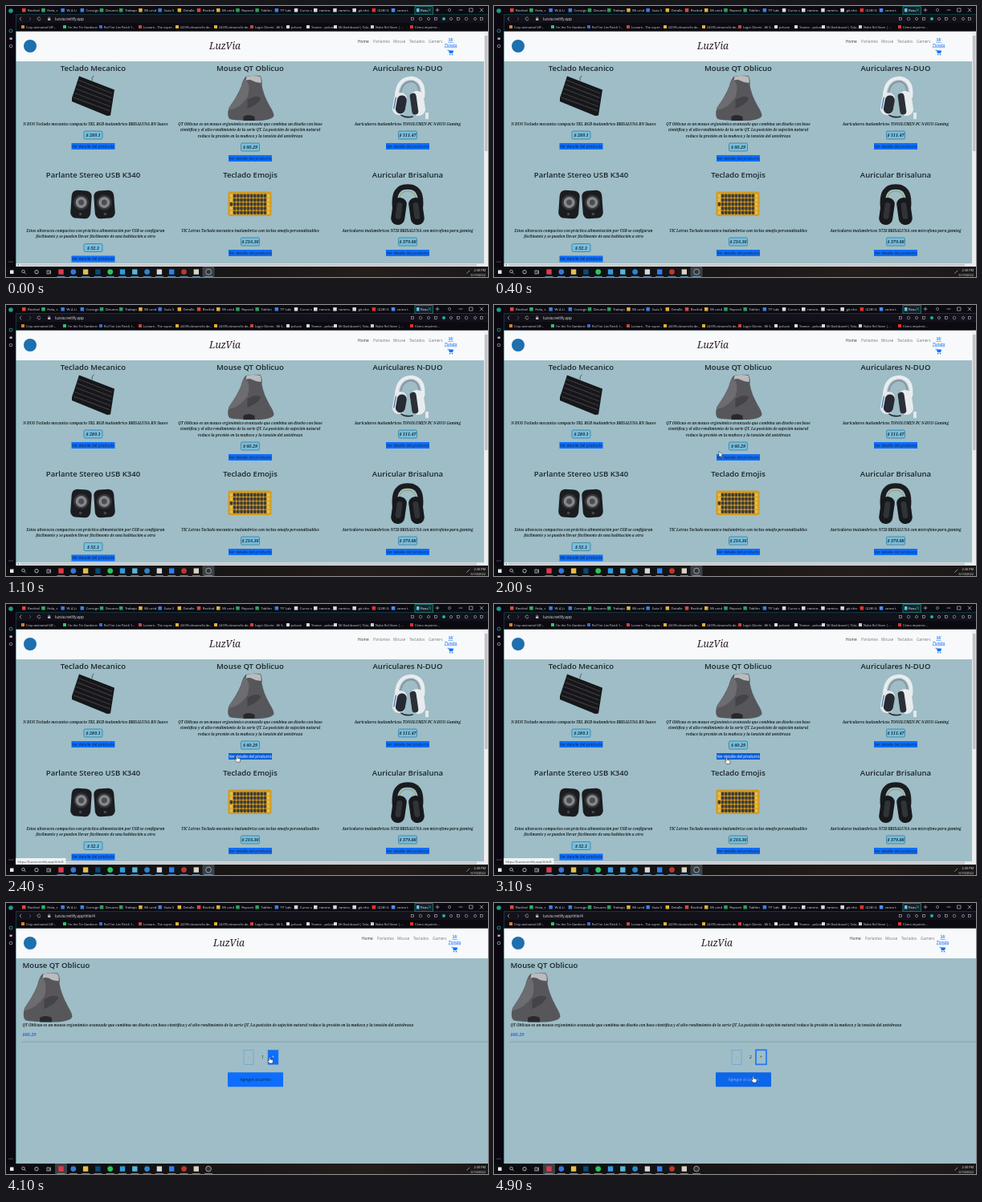
Write an HTML page that moves like this. It is 600 px wide and 338 px high and loops after 5000 ms.

```html
<!DOCTYPE html>
<html lang="es">
<head>
<meta charset="utf-8">
<title>Tienda</title>
<style>
  html, body { margin: 0; width: 100%; height: 100%; overflow: hidden; background: #0a0a0f; }
  svg { display: block; width: 100vw; height: 100vh; }
  text { font-family: "Open Sans", "Noto Sans", sans-serif; white-space: pre; }
  .serif { font-family: "Noto Serif", serif; font-style: italic; }
  .bold { font-weight: 700; }
  .mid { text-anchor: middle; }
  .title { font-weight: 600; }
</style>
</head>
<body>
<svg id="stage" viewBox="0 0 600 338" xmlns="http://www.w3.org/2000/svg"></svg>
<script>
const LOOP = 5000, STEP = 100;
const PAGE = '#9ebdc6', BLUE = '#0d6efd', INK = '#1b2428';
const BRAND = 'LuzVia', HOST = 'luzvia.netlify.app';

const rect = (x, y, w, h, fill, more = '') =>
  `<rect x="${x}" y="${y}" width="${w}" height="${h}" fill="${fill}" ${more}/>`;
const circle = (x, y, r, fill, more = '') =>
  `<circle cx="${x}" cy="${y}" r="${r}" fill="${fill}" ${more}/>`;
const path = (d, fill, more = '') => `<path d="${d}" fill="${fill}" ${more}/>`;
const line = (d, color, width = 0.7) =>
  path(d, 'none', `stroke="${color}" stroke-width="${width}" stroke-linecap="round" stroke-linejoin="round"`);
const text = (x, y, size, s, fill = INK, cls = '', more = '') =>
  `<text x="${x}" y="${y}" font-size="${size}" fill="${fill}" class="${cls}" ${more}>${s}</text>`;
const group = (id, body, at = '') => `<g id="${id}" ${at && `transform="${at}"`}>${body}</g>`;
const turn = (angle, x, y, body) => group('', body, `rotate(${angle} ${x} ${y})`);

// Browser frame

function tabs() {
  const list = [
    ['Recibid', '#d8483c'], ['Hola, c', '#2fae62'], ['W-4-Li', '#3f7de0'], ['Consign', '#3f7de0'],
    ['Desarro', '#2f9e5b'], ['Trabajo', '#2f9e5b'], ['Mi unid', '#e0b23a'], ['Guia S', '#3f7de0'],
    ['Detalle', '#e0b23a'], ['Recibid', '#d8483c'], ['Mi unid', '#e0b23a'], ['Reposit', '#2f9e5b'],
    ['Tablón', '#2f9e5b'], ['TP Lab', '#3f7de0'], ['Curso c', '#d9d9e2'], ['ramiro-', '#d9d9e2'],
    ['ramiro-', '#d9d9e2'], ['git-che', '#d9d9e2'], ['(228) G', '#e0332c'], ['como t', '#4c8bf0']
  ];
  return list.map(([label, color], i) => {
    const x = 27 + i * 24.2;
    return rect(x - 7, 3, 4.5, 4.5, color) + text(x, 6.8, 4.3, label, '#dddce4');
  }).join('');
}

function bookmarks() {
  const list = [
    [25, 'Crop animated GIF...', '#d6802f'], [77, "I'm the Tin Gardener", '#35c26b'],
    [122, 'Rol Tier List Patch 1...', '#3c68c8'], [171, 'Lumaro - The super...', '#c8463c'],
    [217, '24395-desarrollo de...', '#e0b23a'], [265, '24395-desarrollo de...', '#e0b23a'],
    [310, 'Login Cliente - Mi S...', '#c8463c'], [355, 'pelusin', '#d9d9e2'],
    [380, 'Tramor - pelusin', '#d9d9e2'], [414, 'Mi Dashboard | Talu...', '#d9d9e2'],
    [460, 'Nube Rol Store | ...', '#c9c9cf'], [509, 'Cómo imprimir...', '#d8352c']
  ];
  return list.map(([x, label, color]) =>
    rect(x - 6, 24, 4, 4, color) + text(x, 27.5, 3.9, label, '#d6d5dc')).join('');
}

function chrome() {
  const teal = '#1fb5a2', grey = '#b9b8c4';
  let s = rect(0, 0, 600, 31.5, '#0b0a11') + rect(0, 0, 12, 326, '#0a0710')
    + rect(12, 11, 588, 10, '#13111a') + circle(6, 6, 2.8, '#1f9c83')
    + line('M12.4 325V10.6H509', '#1a5a60', 0.6) + line('M531.5 10.6H600', '#1a5a60', 0.6)
    + rect(509, 0.7, 22.5, 9.6, '#16202a', `stroke="${teal}" stroke-width=".6"`)
    + rect(511, 3, 3.5, 4.5, '#55c8e6') + text(516, 6.8, 4.3, 'Reac', '#f2f2f6')
    + line('M526 3.5l3 3m0 -3l-3 3', teal) + line('M535 5h4m-2 -2v4', grey)
    + line('M564 5h4M577 3h4v4h-4zM590 3l4 4m0 -4l-4 4', grey) + circle(552, 5, 1.6, 'none', `stroke="${grey}" stroke-width=".6"`);
  s += line('M19 14l-2 2l2 2', grey) + line('M29 14l2 2l-2 2', '#666572')
    + line('M42.6 14.6a2 2 0 1 0 .4 2', grey) + rect(52, 15.4, 3.4, 2.6, grey) + line('M52.8 15v-1h1.8v1', grey, 0.5);
  [506, 516, 526, 535, 545, 554, 563, 573, 584, 592].forEach((x, i) => {
    s += i === 4 ? circle(x, 16, 2, teal) : rect(x - 1.6, 14.4, 3.2, 3.2, 'none', `stroke="${grey}" stroke-width=".6" rx="${i % 3}"`);
  });
  s += circle(6, 31, 2, 'none', `stroke="${teal}" stroke-width=".8"`)
    + rect(4.5, 39.5, 3.2, 2.4, grey) + circle(6, 50, 1.8, 'none', `stroke="${grey}" stroke-width=".7"`);
  [4, 6, 8].forEach(x => s += circle(x, 319, 0.5, grey));
  return s + tabs() + bookmarks();
}

function taskbar() {
  const icons = ['#e03a4a', '#3577d6', '#e6bd4c', '#0b4a78', '#2cc45c', '#2f9be0', '#57b6d8', '#2a86d0',
    '#d5d8dc', '#2d7ff0', '#b8382f', '#d8d2c4', '#30343a'];
  let s = `<linearGradient id="bar"><stop offset=".1" stop-color="#0b0d10"/><stop offset=".75" stop-color="#241d1b"/>
      <stop offset="1" stop-color="#1b1819"/></linearGradient>`
    + rect(0, 325, 600, 13, 'url(#bar)') + rect(0, 325, 15, 13, '#3b4147', 'id="active"')
    + rect(5, 329.5, 4.5, 4.5, '#e8eaec') + circle(21.5, 331, 1.8, 'none', 'stroke="#ddd" stroke-width=".7"')
    + line('M22.9 332.4l1.6 1.6', '#ddd') + circle(38, 331.7, 2.2, 'none', 'stroke="#ddd" stroke-width=".8"')
    + rect(51, 330, 3, 4, 'none', 'stroke="#ddd" stroke-width=".7"') + line('M55.5 330v4', '#ddd');
  icons.forEach((color, i) => {
    const x = 68.5 + i * 15.3;
    s += i % 3 === 1 || i === 12
      ? circle(x, 331.6, 3.4, color, i === 12 ? 'stroke="#ccc" stroke-width=".7"' : '')
      : rect(x - 3.2, 328.4, 6.4, 6.4, color);
    s += rect(x - 5, 337.2, 10, 0.8, '#6aa7d8');
  });
  return s + line('M573.5 333.5l3.5 -3.5', '#bbb')
    + text(597, 330.6, 3.9, '2:30 PM', '#eee', '', 'text-anchor="end"')
    + text(597, 336.6, 3.9, '6/10/2022', '#eee', '', 'text-anchor="end"');
}

function navbar() {
  const items = [[438, 'Home'], [457, 'Parlantes'], [482, 'Mouse'], [502, 'Teclados'], [526, 'Gamers']];
  const links = items.map(([x, s], i) => text(x, 46.4, 4.8, s, i ? '#777b80' : '#303438')).join('');
  const link = (y, s) => text(553.5, y, 5, s, BLUE, 'serif mid', 'text-decoration="underline"');
  return text(272.5, 53.6, 12, BRAND, '#2b1d22', 'serif mid') + links + link(44.4, 'Mi') + link(50.6, 'Tienda')
    + line('M550 55.2h1.2l1.2 3.4h3.4l1 -2.6h-4.8', BLUE, 0.8) + path('M551.5 55.8h5l-1 3h-3.4z', BLUE)
    + circle(552.6, 60.6, 0.8, BLUE) + circle(555.5, 60.6, 0.8, BLUE);
}

// Product pictures

const art = {
  board() {
    let keys = '';
    for (let r = 0; r < 5; r++)
      keys += line(`M${90.5 - r * 1.5} ${92.5 + r * 5.4}L${132 - r * 0.8} ${109 + r * 5.4}`, '#40383f', 1.2);
    return path('M91 87.5L135 104.5L130 136.5L126 137L82 119L82 115Z', '#15171a') + keys
      + line('M107 93Q106 90 109 87', '#222', 0.6);
  },
  mouse() {
    return path('M23 1Q32 -1 41 0Q44 4 43 12Q45 24 53 38Q58 46 58 50Q56 55 40 56Q10 56 3 54Q-1 50 2 40Q12 26 17 14Q19 5 23 1Z', '#57575b')
      + path('M24 1Q32 -1 41 1Q43 5 42 9Q36 9 31 6Q27 4 23 6Z', '#b9bbbd')
      + path('M22 5Q30 10 25 27Q16 40 2 43Q2 39 6 34Q15 22 17 14Q19 7 22 5Z', '#6d6d71')
      + path('M25 30Q36 23 42 28Q38 36 25 41Z', '#434348')
      + path('M20 51Q26 47 34 51V56H20Z', '#29292c');
  },
  white() {
    const left = rect(482, 108, 16, 28, '#e4e8ec', 'rx="7.5"') + rect(486, 111, 12, 23, '#262b33', 'rx="6"')
      + line('M484 115V129', '#3d6fb0', 1.2);
    const right = rect(504, 106, 17, 31, '#e9ecef', 'rx="8"') + rect(504, 108, 8, 27, '#2b3038', 'rx="4"');
    return line('M486 114Q487 90 505 90Q521 92 519 113', '#e9edf0', 4.5)
      + line('M491 111Q492 95 505 94Q515 96 514 110', '#8b939c', 1.8)
      + turn(10, 490, 122, left) + turn(-8, 512, 122, right)
      + rect(522, 133, 4, 8, '#e4e7ea') + line('M492 136Q497 140 506 138', '#23282e', 1.6);
  },
  speakers() {
    const one = (x, tilt) => turn(tilt, x + 12.5, 247, rect(x, 230, 25, 35, '#1b1c1f', 'rx="7"')
      + circle(x + 12.5, 245, 9.5, '#34363a') + circle(x + 12.5, 245, 7, '#85878b')
      + circle(x + 12.5, 245, 3.4, '#4c4e52') + circle(x + 12.5, 259.5, 1.8, '#45474b'));
    return one(81, 4) + one(110, -4);
  },
  emoji() {
    let s = rect(276.5, 231.5, 54, 30.5, '#d29b22', 'rx="2.5"');
    for (let r = 0; r < 5; r++)
      for (let c = 0; c < 12; c++)
        s += rect(278.6 + c * 4.2, 234.6 + r * 5.2, 3.6, 4.5, c === 11 || (c === 0 && r !== 2) ? '#e8bd45' : '#403d37', 'rx="1.4"');
    return s;
  },
  black() {
    const cup = x => rect(x, 239, 17, 34, '#17191c', 'rx="8"') + rect(x + 5, 245, 7, 21, '#303338', 'rx="3.5"');
    return line('M484 250Q482 225 500 225.5Q518 225 516 250', '#1a1c1f', 6.5)
      + line('M489 241Q491 231 500 231Q509 231 511 241', '#8f9a3a', 0.8)
      + turn(8, 489, 256, cup(480.5)) + turn(-8, 511, 256, cup(502.5));
  }
};

// Shop list

const MOUSE = 'Mouse QT Oblicuo';
const mouseText = [
  'QT Oblicuo es un mouse ergonómico avanzado que combina un diseño con base',
  'científica y el alto rendimiento de la serie QT. La posición de sujeción natural',
  'reduce la presión en la muñeca y la tensión del antebrazo'
];

function card(x, top, name, picture, about, price, id = '') {
  const low = top + (about.length - 1) * 7.5;
  return text(x, top + 81.1, 9.55, name, INK, 'title mid') + picture
    + about.map((s, i) => text(x + (x < 200 ? 3 : 0), top + 148.7 + i * 7.5, 4.45, s, INK, 'serif bold mid')).join('')
    + rect(x - 11.5, low + 156, 23, 10, '#78bedd', 'rx="1.5" stroke="#2b7391" stroke-width=".7"')
    + text(x, low + 163, 5.4, '$ ' + price, '#14262e', 'serif bold mid')
    + rect(x - 27, low + 171, 54, 8, BLUE, id && `id="${id}Box"`)
    + text(x, low + 176.8, 4.75, 'Ver detalle del producto', '#14243c', 'mid', id && `id="${id}Text"`);
}

function shop() {
  return card(108.5, 0, 'Teclado Mecanico', art.board(),
      ['N DUO Teclado mecanico compacto TKL RGB inalambrico BRISALUNA RN Suave'], '289.1')
    + card(304, 0, MOUSE, group('', art.mouse(), 'translate(275.5 87)'), mouseText, '60.29', 'more')
    + card(500, 0, 'Auriculares N-DUO', art.white(), ['Auriculares inalambricos TONOLUMEN PC N-DUO Gaming'], '111.47')
    + card(108.5, 133, 'Parlante Stereo USB K340', art.speakers(),
      ['Estos altavoces compactos con práctica alimentación por USB se configuran',
       'fácilmente y se pueden llevar fácilmente de una habitación a otra'], '52.1')
    + card(304, 133, 'Teclado Emojis', art.emoji(),
      ['TIC Letras Teclado mecanico inalambrico con teclas emojis personalizables'], '216.36')
    + card(500, 133, 'Auricular Brisaluna', art.black(),
      ['Auriculares inalambricos N728 BRISALUNA con microfono para gaming'], '379.88')
    + rect(595, 31.5, 5, 293.5, '#eceef0') + rect(596, 37, 3.4, 144, '#bfc1c4')
    + rect(12, 321, 583, 4, '#e6e9eb') + rect(18, 321.7, 568, 2.6, '#c3c6c9')
    + path('M14.3 323l1.6 -1.2v2.4z', '#666');
}

// Detail page; the lower block slides down once data arrives

function detail() {
  const frame = 'stroke-width=".6" stroke="#3f86d8"';
  return group('info', text(20.5, 81.1, 9.55, MOUSE, INK, 'title')
      + group('', art.mouse(), 'translate(21 87.5) scale(1.06 1.09)')
      + text(20.5, 153.7, 4.45, mouseText.join(' '), INK, 'serif bold'))
    + group('lower', text(20.5, 147.2, 5.4, '$', '#1c5fe0', 'serif bold', 'id="price"')
      + rect(20, 153.5, 580, 0.7, '#7f979f')
      + rect(296, 164, 12, 18, 'none', 'stroke="#5f9bd6" stroke-width=".6"') + text(302, 174.8, 5, '-', '#48708c', 'mid')
      + text(319.5, 174.8, 5, '1', INK, 'mid', 'id="count"')
      + rect(326, 164, 13, 18, 'none', `id="plusBox" ${frame}`) + text(332.5, 174.8, 5, '+', INK, 'mid', 'id="plusText"')
      + rect(276, 192, 69, 18, BLUE, 'id="addBox" rx="1"')
      + text(310.5, 203, 4.75, 'Agregar al carrito', '#14243c', 'mid', 'id="addText"'));
}

const arrow = path('M0 0V7.2L1.7 5.7L2.9 8.2L4.1 7.6L3 5.2H5.2Z', '#fff', 'stroke="#111" stroke-width=".5"');
const hand = path('M0 .7Q.8 -.5 1.5 .7V3L4.6 3.7Q5.3 4 5.1 5L4.5 8H.6L-1.7 5Q-1.6 3.9 -.5 4.4L0 4.8Z', '#fff', 'stroke="#111" stroke-width=".5"');

document.getElementById('stage').innerHTML =
  rect(12, 31.5, 588, 293.5, PAGE) + rect(12, 31.5, 588, 37.5, '#f8f9fa') + circle(30, 50, 8, '#1d6fae')
  + group('nav', navbar()) + group('shop', shop()) + group('detail', detail()) + chrome()
  + text(61, 17.8, 4.6, HOST, '#e8e8ee', '', 'id="url"')
  + group('status', rect(12, 317, 62.5, 8, '#f1f3f4') + text(14.5, 322.8, 4, `https://${HOST}/title/4`, '#4a4d52'))
  + taskbar() + group('arrow', arrow) + group('hand', hand);

const el = {};
document.querySelectorAll('#stage [id]').forEach(n => { if (n.id) el[n.id] = n; });

const show = (node, on) => node.setAttribute('visibility', on ? 'visible' : 'hidden');
const put = (node, x, y) => node.setAttribute('transform', `translate(${x} ${y})`);
const ease = p => p * p * (3 - 2 * p);

const route = [
  [1500, 270, 338], [2000, 280, 182.5], [2600, 289, 191.5], [3100, 289, 191.5],
  [3400, 287.5, 191.5], [3700, 287.5, 191.5], [4200, 332, 192], [4500, 332, 192],
  [4800, 330, 207], [4900, 322, 216]
];

function pointer(t) {
  const i = route.findIndex(k => k[0] >= t);
  if (i < 0) return route[route.length - 1].slice(1);
  if (i === 0) return route[0].slice(1);
  const [t0, x0, y0] = route[i - 1], [t1, x1, y1] = route[i];
  const p = ease((t - t0) / (t1 - t0));
  return [x0 + (x1 - x0) * p, y0 + (y1 - y0) * p];
}

function draw(t) {
  const opened = t >= 3200, loaded = t >= 3700, added = t >= 4400;
  const [x, y] = pointer(t);
  const inside = (x0, y0, x1, y1) => x >= x0 && x <= x1 && y >= y0 && y <= y1;
  const overMore = !opened && inside(277, 186, 331, 194);
  const overPlus = loaded && inside(326, 183, 339, 201);
  const overAdd = loaded && inside(276, 211, 345, 229);
  const link = overMore || overPlus || overAdd;

  show(el.shop, !opened);
  show(el.detail, opened);
  show(el.info, opened && loaded);
  show(el.status, overMore && t >= 2300);
  put(el.nav, opened ? 5 : 0, 0);
  put(el.lower, 0, loaded ? 19.3 : 0);
  put(el.active, opened ? 61 : 244.5, 0);
  el.url.textContent = HOST + (opened ? '/title/4' : '');
  el.price.textContent = loaded ? '$60.29' : '$';
  el.count.textContent = added ? '2' : '1';

  el.moreBox.setAttribute('fill', overMore ? '#0b5ed7' : BLUE);
  el.moreText.setAttribute('fill', overMore ? '#fff' : '#14243c');
  el.plusBox.setAttribute('fill', overPlus ? BLUE : 'none');
  el.plusBox.setAttribute('stroke', added ? '#2476ee' : '#3f86d8');
  el.plusBox.setAttribute('stroke-width', added ? 1.7 : 0.6);
  el.plusText.setAttribute('fill', overPlus ? '#fff' : INK);
  el.addBox.setAttribute('fill', overAdd ? '#0c66ea' : BLUE);
  el.addText.setAttribute('fill', overAdd ? '#8fb0dc' : '#14243c');

  show(el.arrow, t >= 1500 && !link);
  show(el.hand, link);
  put(el.arrow, x, y);
  put(el.hand, x, y);
}

let start;
function tick(now) {
  start ??= now;
  draw(Math.floor(((now - start) % LOOP) / STEP) * STEP);
  requestAnimationFrame(tick);
}
draw(0);
requestAnimationFrame(tick);
</script>
</body>
</html>
```
